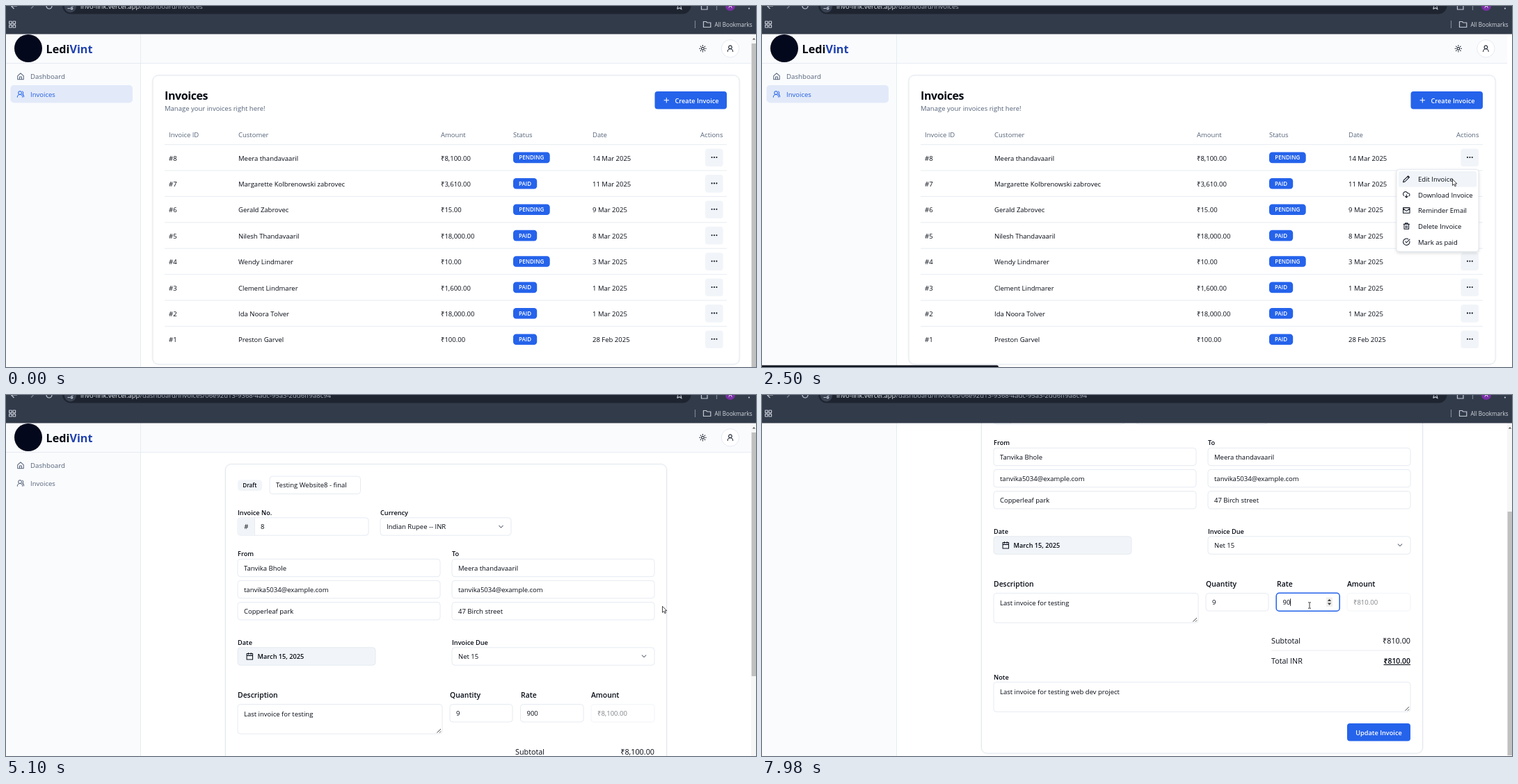
Recreate the animation shown at these times as an HTML page. Size 1078 by 520 pixels, loop 8000 ms.

```html
<!DOCTYPE html>
<html lang="en">
<head>
<meta charset="utf-8">
<title>Invoices</title>
<style>
html, body { margin: 0; width: 100%; height: 100%; overflow: hidden; background: #fff; }
svg { display: block; }
text { font: 400 9.5px "Open Sans", "Noto Sans", sans-serif; fill: #050a14; white-space: pre; }
.semi { font-weight: 600; font-size: 9.2px; }
.muted { fill: #55637a; }
.white { fill: #fff; }
.blue { fill: #1f5be0; }
.tiny { font-size: 8.1px; }
.big { font-size: 10.8px; }
.head { font-weight: 600; font-size: 10.4px; }
.title { font-weight: 700; font-size: 16px; letter-spacing: -.4px; }
.brand { font-weight: 700; font-size: 16.2px; }
.end { text-anchor: end; }
.mid { text-anchor: middle; }
.card { fill: #fff; stroke: #e2e8f0; filter: drop-shadow(0 .7px 1px #00000012); }
.box { fill: #fff; stroke: #e2e8f0; stroke-width: .9; }
.line { stroke: #e5eaf1; stroke-width: .9; fill: none; }
.ico { fill: none; stroke-width: 2.2; stroke-linecap: round; stroke-linejoin: round; }
</style>
</head>
<body>
<svg id="stage" width="1078" height="520" viewBox="0 0 1078 520"></svg>
<script>
const LOOP = 8000, INK = '#0b1220', GRAY = '#55637a', BLUE = '#2563eb', PALE = '#f1f5f9';

const ICONS = {
  house: 'M15 21v-8H9v8M3 10l9-8 9 8v11H3z',
  users: 'M18 21a8 8 0 0 0-16 0M10 3a5 5 0 1 0 .01 0M22 20c0-3.4-2-6.5-4-8a5 5 0 0 0-.5-8.3',
  sun: 'M12 8a4 4 0 1 0 .01 0M12 2v2M12 20v2M2 12h2M20 12h2M5 5l1.4 1.4M17.6 17.6 19 19M5 19l1.4-1.4M17.6 6.4 19 5',
  user: 'M12 3a5 5 0 1 0 .01 0M20 21a8 8 0 0 0-16 0',
  pencil: 'M17 3l4 4L7.5 20.5 2 22l1.5-5.5zM15 5l4 4',
  cloud: 'M4 15A7 7 0 1 1 15.7 8h1.8a4.5 4.5 0 0 1 2.5 8.2M12 12v9M8 17l4 4 4-4',
  mail: 'M2 4h20v16H2zM22 7l-10 7L2 7',
  trash: 'M3 6h18M19 6v15H5V6M8 6V3h8v3M10 11v6M14 11v6',
  check: 'M21.8 10A10 10 0 1 1 17 3.3M9 11l3 3L22 4',
  date: 'M3 4h18v18H3zM3 10h18M8 2v4M16 2v4',
  down: 'M6 9l6 6 6-6',
  plus: 'M5 12h14M12 5v14'
};

const txt = (x, y, s, cls = '', extra = '') => `<text x="${x}" y="${y}" class="${cls}" ${extra}>${s}</text>`;
const rect = (x, y, w, h, r, extra) => `<rect x="${x}" y="${y}" width="${w}" height="${h}" rx="${r}" ${extra}/>`;
const path = (d, extra) => `<path d="${d}" ${extra}/>`;
const line = (x1, x2, y) => path(`M${x1} ${y}H${x2}`, 'class="line"');
const group = (s, extra) => `<g ${extra}>${s}</g>`;
const icon = (name, cx, cy, color = INK, size = 11.3) => path(ICONS[name],
  `class="ico" stroke="${color}" transform="translate(${cx - size / 2} ${cy - size / 2}) scale(${size / 24})"`);
const button = (x, y, w, s, tx) => rect(x, y, w, 25.6, 4, `fill="${BLUE}"`) + txt(tx, y + 16.6, s, 'semi white mid');
const field = (x, y, w, s, cls = '', extra = '') =>
  rect(x, y, w, 25.4, 4, 'class="box"') + txt(x + 9, y + 16.2, s, cls, extra);
const area = (x, y, w, s) => rect(x, y, w, 42.6, 4, 'class="box"') + txt(x + 9, y + 17.4, s) +
  path(`M${x + w - 7.5} ${y + 41}l5.5-5.5M${x + w - 4} ${y + 41}l2-2`, 'stroke="#333" stroke-width=".9"');

// Browser bars
function browser() {
  const thin = 'fill="none" stroke="#c3c9d3" stroke-width="1.2"';
  const dim = 'fill="none" stroke="#7a8391" stroke-width="1.2"';
  let s = rect(0, 0, 1078, 40.5, 0, 'fill="#323b4a"') + rect(81, -16, 903.5, 27.5, 12, 'fill="#1e2530"') +
    path('M16 0H7.5M11.5 4L7.5 0', thin) + path('M36 3.5L39.5 0', dim) +
    path('M58 0a4 4 0 0 0 8 0', thin) +
    '<circle cx="92.5" cy="1" r="8.5" fill="#3a4353"/>' + path('M88.5 3.5H92M94 0h3', thin) +
    '<circle cx="94.5" cy="3.5" r="1.3" ' + thin + '/>' +
    path('M964.8 4.5l.8-4M964.8 4.5l3-1.8 3 1.8-.8-4', thin) +
    path('M999.5 0v5H1008V0', thin) + path('M1021.5 0v6', dim) +
    '<circle cx="1041" cy="0" r="7" fill="#7a2fa5"/>' + txt(1041, 2.8, 'A', 'tiny white mid') +
    '<circle cx="1068" cy="3.6" r="1.1" fill="#c3c9d3"/>';
  for (const [x, y] of [[4.6, 22], [10, 22], [4.6, 27.4], [10, 27.4]]) s += rect(x, y, 3.6, 3.6, .3, thin);
  return s + path('M990.5 21v11', dim) +
    path('M1002.5 22.5h4l1.3 1.5h5v6.5h-10.3z', thin) +
    txt(1018.5, 29.6, 'All Bookmarks', 'tiny', 'style="fill:#d5d9e0"') +
    '<text x="107" y="4" style="fill:#e3e6ea">invo-link.vercel.app<tspan id="url" fill="#a9b0bb"></tspan></text>';
}

// Sidebar and page header
function shell(active) {
  const color = active ? BLUE : GRAY;
  return rect(0, 0, 193.5, 700, 0, 'fill="#fafbfd"') + rect(0, 40, 1071, 42.5, 0, 'fill="#fafbfd"') +
    path('M193.5 0V700', 'class="line"') + line(0, 1071, 82.5) +
    '<circle cx="32" cy="61" r="20" fill="#04081c"/>' +
    '<text x="57.5" y="68" class="brand">Ledi<tspan fill="#1e40af">Vint</tspan></text>' +
    icon('house', 21, 101.5, GRAY) + txt(35, 105, 'Dashboard', 'muted', 'style="font-size:9.7px"') +
    (active ? rect(6.5, 114, 175.5, 25.5, 5, 'fill="#e2eaf9"') : '') +
    icon('users', 21, 127, color) + txt(35, 130.6, 'Invoices', active ? 'blue' : 'muted') +
    group(icon('sun', 1001.5, 61.3) +
      '<circle cx="1041" cy="61.3" r="12.7" class="box"/>' + icon('user', 1041, 61.3), 'class="shift"');
}

const ROWS = [
  ['Meera thandavaaril', '8,100.00', 0, '14 Mar'],
  ['Margarette Kolbrenowski zabrovec', '3,610.00', 1, '11 Mar'],
  ['Gerald Zabrovec', '15.00', 0, '9 Mar'],
  ['Nilesh Thandavaaril', '18,000.00', 1, '8 Mar'],
  ['Wendy Lindmarer', '10.00', 0, '3 Mar'],
  ['Clement Lindmarer', '1,600.00', 1, '1 Mar'],
  ['Ida Noora Tolver', '18,000.00', 1, '1 Mar'],
  ['Preston Garvel', '100.00', 1, '28 Feb']
];
const ROW_TOP = 199.6, ROW_H = 37.4;

function listPage() {
  let s = shell(true) + rect(211, 100, 843, 416, 8, 'class="card"') +
    txt(228, 135.2, 'Invoices', 'title') + txt(228, 151.2, 'Manage your invoices right here!', 'muted') +
    button(932.5, 123, 103.5, 'Create Invoice', 993) + icon('plus', 949.3, 135.8, '#fff') +
    rect(228, 0, 808, ROW_H, 0, 'id="hover" fill="#f8fafc"');
  [[234, 'Invoice ID'], [334, 'Customer'], [625, 'Amount'], [729, 'Status'], [843, 'Date']]
    .forEach(([x, h]) => s += txt(x, 189.2, h, 'muted'));
  s += txt(1030.5, 189.2, 'Actions', 'muted end');
  ROWS.forEach(([name, sum, paid, day], i) => {
    const y = ROW_TOP + ROW_H * i, base = y + 23, w = paid ? 34.2 : 52.7;
    s += line(228, 1036, y) + txt(234, base, '#' + (8 - i)) + txt(334, base, name) +
      txt(625, base, '₹' + sum) + txt(843, base, day + ' 2025') +
      rect(729, y + 11, w, 15.6, 4.3, `fill="${BLUE}"`) +
      txt(729 + w / 2, y + 21.8, paid ? 'PAID' : 'PENDING', 'semi tiny white mid', 'style="font-size:8px"');
    const dots = [-3.4, 0, 3.4].map(d => `<circle cx="${1018 + d}" cy="${y + 18.4}" r="1.05" fill="${INK}"/>`).join('');
    s += group(rect(1005, y + 6, 25.7, 25.7, 4, `fill="${PALE}"`) + dots, 'class="shift"');
  });
  return s;
}

function menu() {
  const items = [['pencil', 'Edit Invoice'], ['cloud', 'Download Invoice'], ['mail', 'Reminder Email'],
    ['trash', 'Delete Invoice'], ['check', 'Mark as paid']];
  return rect(912, 235.3, 118, 118.5, 4, 'class="card" style="filter:drop-shadow(0 2px 2px #0002)"') +
    rect(914.8, 238, 112.4, 22.7, 2.5, `id="pick" fill="${PALE}"`) +
    items.map(([name, s], i) => icon(name, 926.3, 249 + 22.7 * i) + txt(943, 253 + 22.7 * i, s)).join('');
}

function editPage() {
  const mail = 'tanvika5034@example.com';
  const upper = rect(333, 101, 35, 15.8, 4.3, `fill="${PALE}"`) + txt(350.3, 112, 'Draft', 'semi mid', 'style="font-size:8.1px"') +
    field(379, 95.8, 130.5, 'Testing Website8 - final') +
    txt(333, 151.3, 'Invoice No.', 'semi') + txt(538, 151.3, 'Currency', 'semi') +
    rect(333, 155.5, 188, 25.4, 4, 'class="box"') + rect(333.4, 155.9, 24, 24.6, 3, `fill="${PALE}"`) +
    path('M357.4 155.5v25.4', 'class="line"') + txt(345.2, 171.8, '#', 'mid') + txt(366, 171.8, '8') +
    field(538, 155.5, 188, 'Indian Rupee -- INR') + icon('down', 711.5, 168.3, '#6b7280');
  let lower = txt(333, 72.2, 'From', 'semi') + txt(641, 72.2, 'To', 'semi');
  [[333, ['Tanvika Bhole', mail, 'Copperleaf park']], [641, ['Meera thandavaaril', mail, '47 Birch street']]]
    .forEach(([x, list]) => list.forEach((s, i) => lower += field(x, 76.3 + 31.1 * i, 291, s)));
  lower += txt(333, 199.6, 'Date', 'semi') + rect(333, 203.8, 198, 25.4, 4, 'class="box" style="fill:#f1f5f9"') +
    icon('date', 350.3, 216.3) + txt(361.5, 220.1, 'March 15, 2025', 'semi') +
    txt(641, 199.6, 'Invoice Due', 'semi') + field(641, 203.8, 291, 'Net 15') + icon('down', 917, 216.3, '#6b7280') +
    txt(333, 275.8, 'Description', 'head') + txt(638, 275.8, 'Quantity', 'head') +
    txt(740, 275.8, 'Rate', 'head') + txt(841, 275.8, 'Amount', 'head') +
    area(333, 285.5, 294, 'Last invoice for testing') +
    field(638, 285.6, 90, '9') + field(739.5, 285.6, 90.5, '', '', 'id="rate"') +
    group(field(841, 285.6, 91, '', 'sum'), 'opacity=".5"') +
    rect(739.2, 285.3, 91, 26, 4.3, `id="ring" fill="none" stroke="${BLUE}" stroke-width="1.5"`) +
    path('M0 293.3v10.6', `id="caret" stroke="${INK}" stroke-width=".9"`) +
    group(rect(811, 291.5, 9, 13.5, .5, 'fill="#efefef"') +
      path('M812.8 297l2.7-3.2 2.7 3.2zM812.8 299.6l2.7 3.2 2.7-3.2z', 'fill="#444"'), 'id="spin"') +
    txt(732, 357.8, 'Subtotal', 'big') + txt(932, 357.8, '', 'big end sum') + line(732, 932, 368) +
    txt(732, 387, 'Total INR', 'big') +
    txt(932, 387, '', 'head end sum', 'style="text-decoration:underline"') +
    txt(333, 409.6, 'Note', 'semi') + area(333, 413.7, 599, 'Last invoice for testing web dev project') +
    button(841, 473, 91, 'Update Invoice', 886.5);
  return shell(false) + rect(315.5, 99.8, 634, 576.2, 8, 'class="card"') +
    group(upper, 'transform="translate(0 21.3)"') + group(lower, 'transform="translate(0 160)"');
}

const stage = document.getElementById('stage');
stage.innerHTML = group(listPage(), 'id="list"') + group(editPage(), 'id="edit"') +
  group(rect(1071, 40, 7, 480, 0, 'fill="#f6f6f6"') + path('M1072.8 48.6h4.4l-2.2-2.6z', 'fill="#555"') +
    rect(1071.6, 0, 6.4, 100, 0, 'id="thumb" fill="#c0c0c0"'), 'id="bar"') +
  group(menu(), 'id="menu"') + browser() +
  path('M0 520V517.6H337.5Q340 517.6 340 520Z', 'id="status" fill="#10151f"') +
  '<circle id="press" r="8.4" fill="#f8e72f" opacity=".72"/>' +
  group(
    path('M0 0V9L2.1 7.1 3.5 10.3 5 9.6 3.6 6.5H6.4Z', 'id="arrow" fill="#fff" stroke="#1a1a1a" stroke-width=".8"') +
    path('M-2-4.2h1.4L0-3.7.6-4.2H2M0-3.7V3.7M-2 4.2h1.4L0 3.7.6 4.2H2', 'id="beam" fill="none" stroke="#222" stroke-width=".9"') +
    path('M-3.6 0a3.6 3.6 0 1 0 7.2 0a3.6 3.6 0 1 0-7.2 0M-2.5-2.5l5 5', 'id="ban" fill="#fff" stroke="#c01420" stroke-width="1.5"'),
    'id="cursor"');

const $ = id => document.getElementById(id);
const show = (id, on) => $(id).style.display = on ? '' : 'none';
const move = (el, x, y) => el.setAttribute('transform', `translate(${x} ${y})`);
const sums = [...document.querySelectorAll('.sum')];
const shifted = [...document.querySelectorAll('.shift')];
const ramp = (t, a, b) => Math.min(1, Math.max(0, (t - a) / (b - a)));

// Pointer path: time, x, y
const PATH = [[710, 1037, 507], [840, 1064, 219], [1170, 1060, 219], [1440, 1025.5, 219.5],
  [2040, 1024, 222], [2500, 992.5, 249.5], [4160, 990, 252], [4640, 943.5, 304.3],
  [5440, 900, 326], [5510, 855, 348], [6370, 858, 345], [6850, 886, 305.8],
  [7120, 798, 303], [7380, 793, 303], [7580, 787, 303]];
const HOLDS = [840, 1440, 2500, 4640, 5440, 5510, 7120];

function pointer(t) {
  let i = PATH.length - 1;
  while (i && PATH[i][0] > t) i--;
  const a = PATH[i], b = PATH[i + 1];
  if (!b || HOLDS.includes(a[0])) return [a[1], a[2]];
  const k = ramp(t, a[0], b[0]);
  return [a[1] + (b[1] - a[1]) * k, a[2] + (b[2] - a[2]) * k];
}

function draw(t) {
  const [x, y] = pointer(t), editing = t >= 4990;
  const scroll = t < 5760 ? 0 : t < 5840 ? 21.3 : 160;

  show('list', !editing);
  show('edit', editing);
  move($('edit'), 0, -scroll);
  $('url').textContent = '/dashboard/invoices' + (editing ? '/06e92d13-9368-4adc-95a3-2dd6ff9a8c94' : '');

  // Dropdown locks the page while it is open
  const locked = t >= 1640 && t < 3700;
  const open = ramp(t, 1620, 1780) * (1 - ramp(t, 3620, 3760));
  show('menu', open > 0);
  $('menu').style.opacity = open;
  move($('menu'), 0, t < 2000 ? (open - 1) * 5 : 0);
  show('pick', y > 238);
  shifted.forEach(el => move(el, locked ? -.6 : 0, 0));
  show('bar', !locked);
  $('thumb').setAttribute('y', 54 + scroll * .7125);
  $('thumb').setAttribute('height', editing ? 351 : 470);
  show('status', t >= 2300 && t < 4360);

  const row = Math.floor((y - ROW_TOP) / ROW_H);
  show('hover', t >= 1170 && !locked && x < 1036);
  $('hover').setAttribute('y', ROW_TOP + ROW_H * row);

  // Rate field
  const short = t >= 7850, focus = t >= 7450;
  const inRate = t > 6850 && x > 739 && x < 830;
  $('rate').textContent = short ? '90' : '900';
  sums.forEach(el => el.textContent = short ? '₹810.00' : '₹8,100.00');
  show('ring', focus);
  show('caret', focus);
  move($('caret'), short ? 759.6 : 765, 0);
  show('spin', inRate);

  const banned = t > 6700 && y < 311 && x > 841;
  show('cursor', t >= 710);
  move($('cursor'), x, y);
  show('arrow', !inRate && !banned);
  show('beam', inRate);
  show('ban', banned);
  show('press', (t >= 1600 && t < 1760) || (t >= 3420 && t < 3620));
  $('press').setAttribute('cx', x);
  $('press').setAttribute('cy', y + 1);
}

const start = performance.now();
function tick() {
  draw((performance.now() - start) % LOOP);
  requestAnimationFrame(tick);
}
tick();
</script>
</body>
</html>
```
